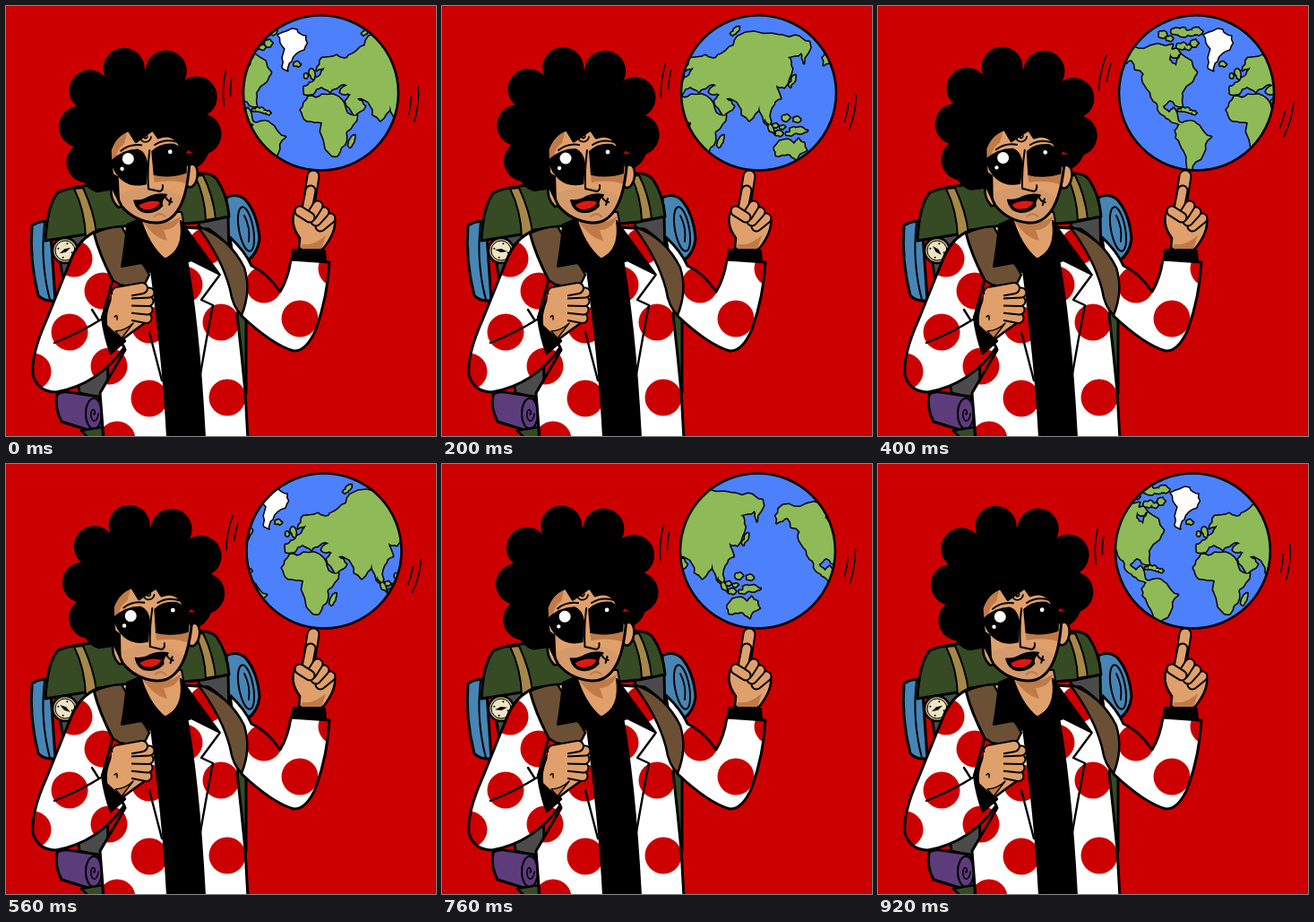
Animation, 480 px wide and 480 px high, one loop 0.96 s. Source, as an HTML page with a canvas:

```html
<!DOCTYPE html>
<html lang="en">
<head>
<meta charset="utf-8">
<title>Spinning globe</title>
<style>
  html, body { margin: 0; width: 100%; height: 100%; overflow: hidden; background: #cc0000; }
  canvas { display: block; width: 480px; height: 480px; }
</style>
</head>
<body>
<canvas id="stage" width="480" height="480"></canvas>
<script>
const ctx = document.getElementById('stage').getContext('2d');
const LOOP = 960, STEP = 40, SPIN = 480, MAP_WIDTH = 290, TAU = Math.PI * 2;
const RED = '#cc0000', INK = '#000', SKIN = '#e0a06b', SHADE = '#bf7a48', STUBBLE = '#d59a6b',
      GREEN = '#364a24', TAN = '#a58748', BROWN = '#6b5036', GREY = '#4b4b4b',
      BLUE = '#4785b5', PURPLE = '#5d3c7c', SEA = '#4d80fb', LAND = '#8fba58';

ctx.lineJoin = ctx.lineCap = 'round';

function draw(d, fill, width = 0, color = INK) {
  const path = d instanceof Path2D ? d : new Path2D(d);
  if (fill) { ctx.fillStyle = fill; ctx.fill(path); }
  if (width) { ctx.lineWidth = width; ctx.strokeStyle = color; ctx.stroke(path); }
}

function oval(x, y, rx, ry, fill, width = 0, turn = 0) {
  const path = new Path2D();
  path.ellipse(x, y, rx, ry, turn, 0, TAU);
  draw(path, fill, width);
}

const disc = (x, y, r, fill, width) => oval(x, y, r, r, fill, width);

function spiral(x, y, rx, ry, turns, width) {
  const path = new Path2D();
  for (let a = 0; a <= turns * TAU; a += 0.2) {
    const k = 1 - a / (turns * TAU);
    path.lineTo(x + rx * k * Math.cos(a), y + ry * k * Math.sin(a));
  }
  draw(path, null, width);
}

function finger(x1, y1, x2, y2, width) {
  const line = `M${x1} ${y1}L${x2} ${y2}`;
  draw(line, null, width + 4);
  draw(line, null, width, SKIN);
}

function turned(x, y, angle, paint) {
  ctx.save();
  ctx.translate(x, y);
  ctx.rotate(angle);
  ctx.translate(-x, -y);
  paint();
  ctx.restore();
}

// --- World map: x runs from the middle of Africa, y is the stage height ---

let seed = 7;
const random = () => (seed = seed * 16807 % 2147483647) / 2147483647;

// Roughens an outline by pushing the middle of every edge sideways, twice.
function coast(corners) {
  let points = corners;
  for (let round = 0; round < 2; round++) {
    points = points.flatMap(([x, y], i) => {
      const [nx, ny] = points[(i + 1) % points.length];
      const push = (random() - 0.5) * 0.36;
      return [[x, y], [(x + nx) / 2 + (ny - y) * push, (y + ny) / 2 - (nx - x) * push]];
    });
  }
  return new Path2D('M' + points.join(' ') + 'Z');
}

const continent = text => coast(text.split(' ').map(pair => pair.split(',').map(Number)));

function island(x, y, rx, ry, lean = 0) {
  return coast(Array.from({ length: 5 }, (_, i) => {
    const dy = ry * Math.sin(i * TAU / 5);
    return [x + rx * Math.cos(i * TAU / 5) + lean * dy, y + dy];
  }));
}

const islands = (count, x, y, width, height, size) => Array.from({ length: count }, (_, i) =>
  island(x + width * ((i + 0.5) / count - 0.5), y + height * (random() - 0.5),
    size * (0.7 + random() * 0.6), size * (0.4 + random() * 0.6)));

const land = new Path2D();
for (const part of [
  continent('-23,101 -8,99 14,105 24,122 31,122 19,140 19,150 9,167 3,167 -8,130 -25,128 -32,116'),
  continent('-28,90 -28,98 -18,98 -9,90 1,96 10,90 24,88 12,96 24,99 18,106 28,122 40,112 31,103 46,111 57,128 68,111 79,134 82,113 92,103 87,88 96,91 105,70 100,57 115,52 118,64 124,40 108,33 82,31 44,34 31,50 20,58 8,55 -8,58 -14,72 -5,68 -12,79 -22,86'),
  continent('-148,50 -124,48 -92,43 -96,60 -88,67 -83,54 -65,74 -70,84 -82,97 -81,112 -95,105 -103,112 -96,119 -91,114 -86,128 -79,132 -96,126 -106,119 -113,106 -123,88 -124,76 -138,60 -150,66'),
  continent('-85,133 -76,129 -62,134 -49,146 -58,165 -71,185 -78,187 -79,162 -88,147'),
  continent('85,158 87,167 100,165 110,172 121,161 112,148 107,154 100,149'),
  island(25, 151, 2.5, 7, -0.4),
  island(-19, 76, 2.5, 6, 0.3),
  island(-26, 78, 2, 2.5),
  island(-36, 65, 4, 2.5),
  island(105, 84, 2.5, 7, -0.4),
  island(79, 134, 3, 9, 0.6),
  island(114, 139, 8, 3),
  island(41, 28, 3, 5, -0.8),
  ...islands(7, 98, 132, 28, 22, 4),
  ...islands(5, -76, 117, 20, 5, 2.5),
  ...islands(6, -84, 33, 46, 10, 5),
  ...islands(5, -82, 47, 36, 12, 5)
]) land.addPath(part);
const ice = continent('-58,32 -36,26 -26,33 -28,49 -42,62 -46,73 -53,68 -50,48');

// One turn per spin, lingering while Africa faces the front.
function scrollAt(time) {
  const p = time % SPIN / SPIN;
  return 34.5 - MAP_WIDTH * p - 23 * Math.cos(TAU * (p - 0.95)) + 4 * Math.cos(2 * TAU * (p - 0.2));
}

function globe(time, sway) {
  const x = 353.5 + 2.1 * sway, y = 97, r = 86.5;
  const ball = new Path2D();
  ball.arc(x, y, r, 0, TAU);
  ctx.save();
  ctx.clip(ball);
  draw(ball, SEA);
  ctx.translate(x + scrollAt(time) - MAP_WIDTH, 0);
  for (let copy = 0; copy < 3; copy++) {
    draw(land, null, 3);
    draw(land, LAND);
    draw(ice, '#fff', 1.5);
    ctx.translate(MAP_WIDTH, 0);
  }
  ctx.restore();
  draw(ball, null, 2.6);

  const whoosh = (radius, angle, spread) => {
    const path = new Path2D();
    path.arc(x, y, radius, angle - spread, angle + spread);
    draw(path, null, 1.6);
  };
  for (const side of [0.2, Math.PI + 0.13]) {
    const angle = side + sway * 0.085;
    whoosh(109, angle, 0.18);
    whoosh(101, angle + 0.02, 0.1);
  }
}

// --- Traveller ---

const DOTS = [[76, 282], [108, 318], [71, 364], [30, 408], [115, 402], [160, 356], [160, 438], [124, 484],
              [199, 311], [224, 268], [240, 353], [247, 437], [288, 311], [328, 349], [369, 293]];

function garment(d) {
  const path = new Path2D(d);
  draw(path, '#fff');
  ctx.save();
  ctx.clip(path);
  for (const [x, y] of DOTS) disc(x, y, 20.5, RED);
  ctx.restore();
  draw(path, null, 3);
}

function compass(sway) {
  const x = 66, y = 273;
  disc(x, y, 14, '#c3b386', 2.4);
  disc(x, y, 11, '#eee4c3', 1);
  for (let a = 0.3; a < TAU; a += TAU / 4) disc(x + 8 * Math.cos(a), y + 8 * Math.sin(a), 1, INK);
  turned(x, y, 0.15 + sway * 0.65, () => draw('M59 273L66 271L73 273L66 275Z', INK));
}

function backpack(sway) {
  draw('M29 245Q38 239 49 241L55 329Q42 330 36 323Q26 284 29 245Z', BLUE, 3);
  draw('M43 242Q38 286 49 328', null, 2);
  draw('M246 214Q257 208 267 216Q281 232 283 260Q281 276 270 284L246 270Z', BLUE, 3);
  oval(268, 249, 8, 25, BLUE, 2, -0.18);
  draw('M266 234Q273 247 271 263', null, 1.8);
  draw('M56 253H112L114 440L82 432Z', GREY, 3);
  draw('M214 238L248 234L249 282L222 270Z', GREY, 3);
  draw('M44 262Q46 222 58 208Q72 202 104 199L205 188Q228 184 235 193Q247 210 249 235L220 241L120 250Z', GREEN, 3);
  draw('M76 204L86 203Q98 229 101 253L89 258Q88 228 76 204Z', TAN, 2);
  draw('M211 190L220 189Q231 211 234 237L223 239Q222 212 211 190Z', TAN, 2);
  draw('M258 330L268 340V432L260 440Z', GREEN, 3);
  draw('M57 434Q61 430 70 431L103 436L108 471L91 473L62 464Q54 448 57 434Z', PURPLE, 3);
  oval(98, 455, 9, 17, PURPLE, 2);
  spiral(98, 455, 5, 10, 1.3, 1.5);
  draw('M84 474L108 470V482H92Z', GREEN, 2.5);
  compass(sway);
}

function raisedArm() {
  garment('M250 258Q267 274 274 290Q292 298 306 319Q315 304 318 283L361 286Q359 324 346 361Q335 386 321 385Q297 378 263 346Z');
  draw('M320 272L356 273L357 285L319 282Z', INK, 2);
  finger(343, 190, 337, 228, 11);
  draw('M324 225Q315 242 328 259L327 271H354Q369 252 367 238Q352 218 324 225Z', SKIN, 2.6);
  draw('M330 266Q344 268 357 256L352 271H330Z', SHADE);
  finger(340, 206, 335, 232, 9);
  for (let i = 2; i >= 0; i--) finger(348 + 7 * i, 223 + 7 * i, 341 + 5 * i, 234 + 6 * i, 9);
  finger(328, 229, 339, 236, 9);
}

function torso() {
  garment('M104 250L145 244L199 247L226 249Q259 270 268 306L258 345Q263 388 267 430L270 484H109L105 432L133 384L92 300Z');
  draw('M98 254Q111 247 129 246L160 300L152 316L127 311L119 306Q105 280 98 254Z', BROWN, 2.5);
  draw('M214 246Q249 258 266 292Q274 318 263 345Q253 336 250 316Q241 282 214 246Z', BROWN, 2.5);
  draw('M160 280L200 272Q215 350 222 482H180Q176 400 160 280Z', INK, 2);
  draw('M148 230H196Q203 262 190 275L178 283Q158 268 148 230Z', SKIN, 2);
  draw('M149 234Q177 249 196 234Q190 250 176 250L180 262Q162 258 149 234Z', SHADE);
  draw('M135 244L149 238Q156 262 176 283L161 297L151 287L129 291Q133 266 135 244Z', INK, 2);
  draw('M195 240Q211 262 239 300L207 284L186 291L176 283Q200 274 195 240Z', INK, 2);
  draw('M238 301L218 328L231 334Q225 364 217 411M160 364L174 418', null, 2.4);
}

function loweredArm() {
  garment('M104 250Q82 258 72 284L45 351Q28 389 30 412Q36 431 56 431Q104 422 132 381L108 346L119 306Q104 277 98 253Z');
  draw('M54 376Q82 365 106 350M103 350L96 339', null, 2.4);
  draw('M107 347Q110 370 117 388L133 374L114 342Z', INK, 2.4);
  draw('M122 317Q109 340 112 357L129 373Q143 362 159 351L152 314Z', SKIN, 2.6);
  for (let i = 3; i >= 0; i--) finger(139, 321 + 8 * i, 160 - i, 320 + 9.5 * i, 9);
  finger(124, 320, 152, 315, 10);
  draw('M118 322H140V352H116Z', SKIN);
  draw('M122 363Q134 362 142 354L129 371ZM121 347Q125 343 124 350', SHADE, 1.4);
}

function hair() {
  oval(153, 128, 64, 58, INK);
  for (let i = 0; i < 7; i++) {
    const a = (15 - 40 * i) * Math.PI / 180;
    disc(153 + 69 * Math.cos(a), 128 + 61 * Math.sin(a), 23, INK);
  }
  disc(92, 173, 23, INK);
  draw('M82 180Q88 204 103 207L123 204V170ZM198 165H228Q222 180 209 183Z', INK);
}

function head() {
  hair();
  oval(208, 190, 7, 13, SKIN, 2.6, 0.15);
  draw('M119 200Q116 214 126 224L134 222Z', SKIN, 2.6);
  const face = new Path2D('M118 160Q124 143 139 138L147 151L166 138L172 147Q187 141 195 154L206 180Q203 211 194 226Q184 243 167 242Q144 240 130 223Q119 204 118 160Z');
  draw(face, SKIN);
  ctx.save();
  ctx.clip(face);
  oval(160, 232, 48, 30, STUBBLE);
  draw('M114 170Q122 146 138 138L134 153Q126 158 124 170ZM166 190L206 187V200Q187 193 167 197Z', SHADE);
  ctx.restore();
  draw(face, null, 3);
  draw('M113 181Q117 205 128 219L127 190Z', INK);

  draw('M118 172Q132 159 149 159Q158 162 160 176L158 199Q142 203 131 194Q122 187 118 172Z', INK);
  draw('M164 162Q174 152 190 154Q200 159 204 170L203 187Q186 193 166 189Z', INK);
  draw('M130 161Q140 153 153 155M168 155Q179 148 192 152', null, 2);
  disc(138, 170, 6.5, '#fff');
  disc(131, 181, 2.2, '#fff');
  disc(185, 163, 2.4, '#fff');
  draw('M162 161Q159 184 160 204L173 207Q177 205 176 200', null, 2);

  draw('M144 217Q153 218 161 213Q170 209 180 211Q173 217 175 223Q168 231 157 230Q147 229 144 217Z', INK, 2);
  draw('M149 222Q162 215 173 219Q169 227 158 227Q151 227 149 222Z', '#df1712');
  draw('M178 211Q180 218 186 219M185 215L183 222', null, 2);
  draw('M166 235Q172 229 178 235', null, 1.8, SHADE);
  spiral(157, 146, 7, 6.5, 1.6, 1.7);
}

function render(time) {
  const sway = -Math.cos((time + 40) / LOOP * TAU);
  ctx.fillStyle = RED;
  ctx.fillRect(0, 0, 480, 480);
  backpack(sway);
  raisedArm();
  torso();
  loweredArm();
  turned(170, 265, sway * 0.018, head);
  globe(time, sway);
}

const start = performance.now();
function tick() {
  const elapsed = (performance.now() - start) % LOOP;
  render(Math.floor(elapsed / STEP) * STEP);
  requestAnimationFrame(tick);
}
tick();
</script>
</body>
</html>
```
